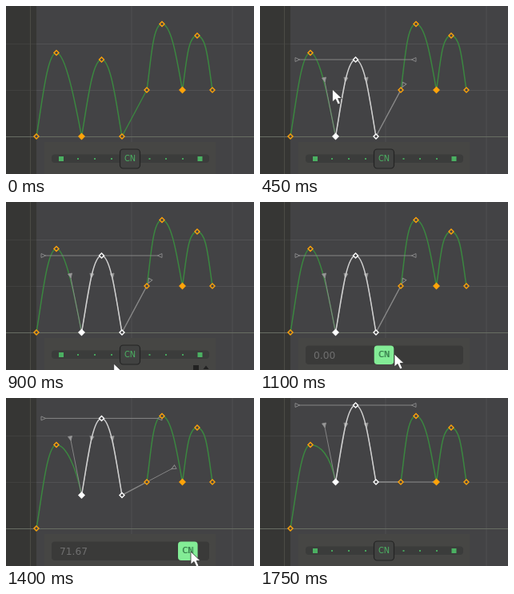
Write an HTML page that moves like this. It is 310x210 px and loops after 2050 ms.

```html
<!DOCTYPE html>
<html lang="en">
<head>
<meta charset="utf-8">
<title>Curve editor slider</title>
<style>
  html, body { margin: 0; width: 100%; height: 100%; overflow: hidden; background: #434345; }
  svg { display: block; width: 310px; height: 210px; }
  text { font-family: "DejaVu Sans", sans-serif; }
</style>
</head>
<body>
<svg id="stage" viewBox="0 0 310 210" xmlns="http://www.w3.org/2000/svg">
  <rect width="310" height="210" fill="#434345"/>
  <rect width="38" height="210" fill="#363634"/>
  <path d="M38 47.5H310M38 105.5H310M157 0V210M283 0V210" stroke="#515153" fill="none"/>
  <path d="M0 47.5H38M0 105.5H38" stroke="#40403e"/>
  <path d="M30.5 0V210" stroke="#4b4c46"/>
  <path d="M0 163.5H310" stroke="#686d63"/>
  <g id="graph"></g>
  <path id="marquee" fill="none" stroke="#fff" stroke-dasharray="3 2"/>
  <rect x="48" y="170" width="214" height="40" fill="#464644"/>
  <g id="panel"></g>
  <path id="cursor" d="M0 0V16L4 12.5L7 19L10 17.7L7.2 11.5H12Z" fill="#fff" stroke="#333" stroke-width=".8"/>
</svg>
<script>
const LOOP = 2050, STEP = 50, HANDLE = 73;
const GREEN = "#3b8740", ORANGE = "#ffa30a", GRAY = "#858585";
const el = id => document.getElementById(id);
const graph = el("graph"), panel = el("panel"), marquee = el("marquee"), cursor = el("cursor");

// [time, x, y] of the pointer
const pointerPath = [
  [100, 198, 190], [150, 164, 169], [250, 86, 43], [300, 83, 39], [350, 84, 48],
  [600, 100, 188], [750, 111, 204], [850, 122, 205], [1000, 160, 196], [1100, 168, 190],
  [1250, 208, 191], [1400, 231, 192], [1450, 248, 190]
];
// [time, offset] of the slider knob
const knobPath = [[1100, 0], [1150, 22], [1200, 36], [1250, 47.2], [1300, 56.5], [1400, 72.3], [1450, 80], [1500, 85.4]];

function along(path, t) {
  if (t <= path[0][0]) return path[0].slice(1);
  for (let i = 1; i < path.length; i++) {
    const a = path[i - 1], b = path[i];
    if (t <= b[0]) {
      const k = (t - a[0]) / (b[0] - a[0]);
      return a.slice(1).map((v, j) => v + (b[j + 1] - v) * k);
    }
  }
  return path[path.length - 1].slice(1);
}

const stroke = (d, color, width = 1) =>
  `<path d="${d}" fill="none" stroke="${color}" stroke-width="${width}"/>`;

const rise = ([x, y], [px, py], dx = 6.5, dy = 36) =>
  `M${x} ${y}C${x + dx} ${y - dy} ${px - 12} ${py} ${px} ${py}`;
const fall = ([px, py], [x, y], dx = 6.5, dy = 36) =>
  `M${px} ${py}C${px + 12} ${py} ${x - dx} ${y - dy} ${x} ${y}`;

function diamond([x, y], color, filled) {
  const r = filled ? 3.5 : 3;
  return `<path d="M${x} ${y - r}l${r} ${r}l${-r} ${r}l${-r} ${-r}z" fill="${filled ? color : "#434345"}" stroke="${color}" stroke-width="1.4"/>`;
}

function handle([x, y], dx, dy, filled) {
  const hx = x + dx, hy = y + dy;
  const angle = Math.atan2(-dy, -dx) * 180 / Math.PI;
  return stroke(`M${x} ${y}L${hx} ${hy}`, GRAY) +
    `<path transform="translate(${hx} ${hy}) rotate(${angle})" d="M-2.5 -2.5L3 0L-2.5 2.5Z" fill="${filled ? "#999" : "#434345"}" stroke="#8e8e8e" stroke-width=".9"/>`;
}

function drawGraph(selected, shift) {
  const A = [38, 163], B = [63, 58.5], C = [94.5, 163 - shift], D = [119.5, 67 - shift], E = [145, 163 - shift];
  const F = [176, 105], G = [195, 22.5], H = [220.5, 105], I = [239, 37], J = [258, 105];
  const active = selected ? "#d0d0d0" : GREEN;
  let out = stroke(rise(A, B) + fall(B, C, 6.5, 34) + rise(F, G, 5, 32) + fall(G, H) + rise(H, I, 5, 32) + fall(I, J, 5, 32), GREEN, 1.5);
  out += stroke(`M${E}L${F}`, selected ? GRAY : GREEN, 1.4);
  if (selected) {
    const dx = F[0] - E[0], dy = F[1] - E[1], k = HANDLE / Math.hypot(dx, dy);
    out += handle(D, -HANDLE, 0) + handle(D, HANDLE, 0);
    for (const [p, side] of [[C, -14], [C, 12.5], [E, -12]]) out += handle(p, side, -71, true);
    out += handle(E, dx * k, dy * k);
  }
  out += stroke(rise(C, D) + fall(D, E), active, 1.5);
  const mark = selected ? "#fff" : ORANGE;
  for (const p of [A, B, F, G, I, J]) out += diamond(p, ORANGE);
  out += diamond(H, ORANGE, true) + diamond(C, mark, true) + diamond(D, mark) + diamond(E, mark);
  graph.innerHTML = out;
}

const label = (x, color) =>
  `<text x="${x}" y="194.3" font-size="9.8" text-anchor="middle" fill="${color}">CN</text>`;

function restPanel() {
  let out = `<rect x="57" y="185.5" width="197" height="10.5" rx="4" fill="#3b3c3b"/>`;
  for (const x of [66, 239.5]) out += `<rect x="${x}" y="188" width="6" height="6" fill="#4bb062"/>`;
  for (const x of [90, 111, 132, 179.5, 200, 221]) out += `<rect x="${x - 1}" y="190" width="2" height="2" fill="#46a45c"/>`;
  return out + `<rect x="142.5" y="179" width="25" height="24" rx="4" fill="#414241" stroke="#242424" stroke-width="1.2"/>` + label(155, "#4bb062");
}

function dragPanel(offset, value) {
  const x = 155 + offset;
  return `<rect x="57" y="179.5" width="197" height="23.5" rx="4" fill="#3a3a39"/>
    <text x="67" y="196" font-size="12.2" fill="#6f6f6f">${value.toFixed(2)}</text>
    <rect x="${x - 12.3}" y="179.5" width="24.6" height="23.5" rx="4" fill="#83ec96"/>` +
    label(x, "#35794a") + label(x + 1, "#35794a88");
}

function drawPanel(t, offset, value) {
  const dragging = t >= 1050 && t < 1700;
  let out = dragging ? dragPanel(offset, value) : restPanel();
  if (t === 1700) out += `<g opacity=".5">${dragPanel(offset, value)}</g>`;
  if (t >= 650 && t < 1050)
    out += `<rect x="234" y="204" width="7" height="6" fill="#222"/><path d="M246.5 209L250 204.5L253.5 209Z" fill="#222"/>`;
  panel.innerHTML = out;
}

function render(time) {
  const t = Math.floor(time / STEP) * STEP;
  const [offset] = along(knobPath, t);
  const value = Math.min(100, 100 * (offset / 85.4) ** 2);
  drawGraph(t >= 350, value * .58);
  drawPanel(t, offset, value);

  const [x, y] = along(pointerPath, t);
  cursor.setAttribute("transform", `translate(${x} ${y})`);
  cursor.style.display = t >= 100 && t < 1500 ? "" : "none";

  const left = Math.round(x + 4) + .5, top = Math.round(y + 7) + .5;
  marquee.setAttribute("d", `M${left} 175.5V${top}H163.5V175.5Z`);
  marquee.style.display = t >= 200 && t < 350 ? "" : "none";
}

const start = performance.now();
function tick() {
  render((performance.now() - start) % LOOP);
  requestAnimationFrame(tick);
}
tick();
</script>
</body>
</html>
```
